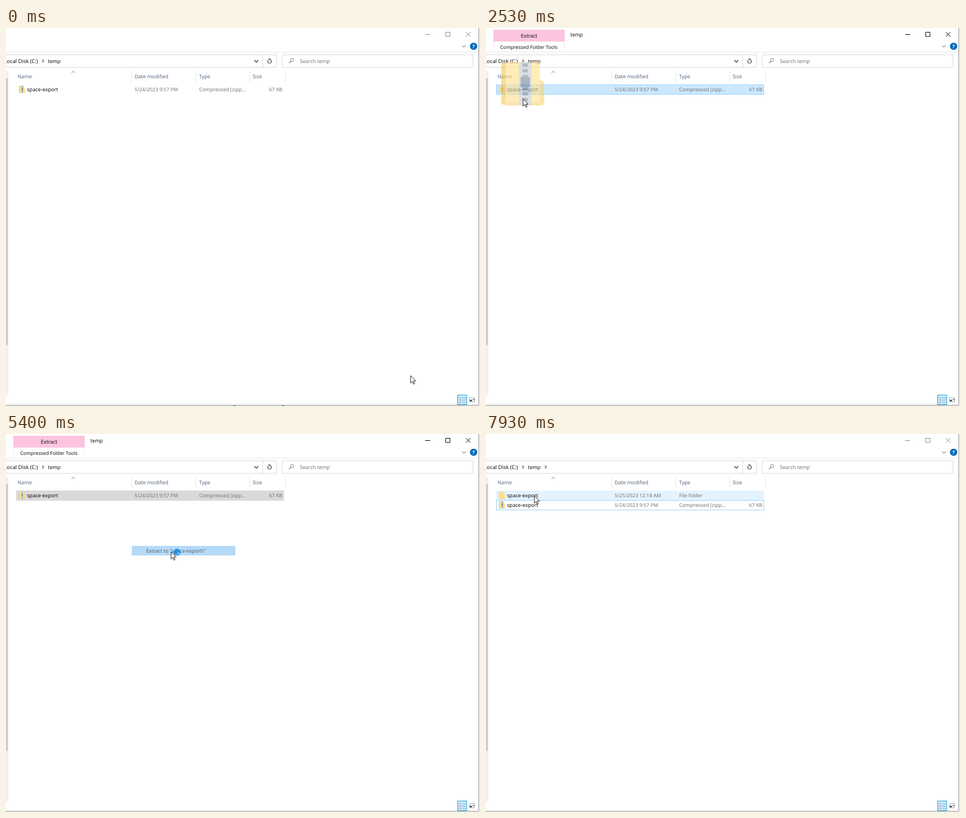
Animation, 837 px wide and 669 px high, one loop 8000 ms. Source, as an HTML page:

```html
<!DOCTYPE html>
<html lang="en">
<head>
<meta charset="utf-8">
<title>Extract an archive</title>
<style>
html, body { margin: 0; width: 100%; height: 100%; overflow: hidden; background: #fff; }
svg { display: block; }
text { font: 9px "Open Sans", "Noto Sans", sans-serif; fill: #000; white-space: pre; text-rendering: geometricPrecision; }
.head { fill: #4c607a; }
.dim { fill: #6d6d6d; }
.name { font-size: 9.1px; }
.path { font-size: 9.3px; }
.date { font-size: 8.8px; }
.menu text { font-size: 8.9px; }
.menu .bold { font-weight: 700; }
.tool { font-size: 8.65px; }
.end { text-anchor: end; }
.mid { text-anchor: middle; }
.line { fill: none; stroke: #d9d9d9; }
.glyph { fill: none; stroke: #444; stroke-width: 1.1; }
#caption { fill: none; }
</style>
</head>
<body>
<svg width="837" height="669" viewBox="0 0 837 669">
  <defs>
    <g id="folderIcon">
      <path d="M0 1.2Q0 .4.8 .4H4.4V12.8H.6Q0 12.8 0 12.2Z" fill="#f2c55c"/>
      <path d="M1 .2H8.6Q9.2 .2 9.2 .8V5.4L10.2 6.2V12.4Q10.2 13 9.6 13H1Z" fill="#ffe08c"/>
      <path d="M9.2 5.4L10.2 6.2V12.4L8.8 13H1.2V12H9.2Z" fill="#f8d374"/>
    </g>
    <g id="zipIcon">
      <use href="#folderIcon"/>
      <path d="M4.2 .2H7.2V13H4.2Z" fill="#c9cdd0"/>
      <path d="M5.7 .6V13" stroke="#7f8f9e" stroke-width="1.3" stroke-dasharray="1 .7"/>
      <path d="M4.6 4.6H6.8V7.6H4.6Z" fill="#6f8397"/>
    </g>
    <path id="right" class="glyph" d="M-1.5 -2.6L1.2 0L-1.5 2.6"/>
  </defs>

  <rect width="837" height="669" fill="#fff"/>
  <path d="M0 42.5H834" stroke="#e8e8e8"/>

  <g id="ribbon">
    <rect x="13" y="3" width="126" height="21" fill="#fcc4df"/>
    <path d="M13.5 24V41M138.5 24V38" stroke="#ececec"/>
    <text class="mid" x="76" y="16.7">Extract</text>
    <text class="mid tool" x="75.7" y="36.5">Compressed Folder Tools</text>
    <text id="title" x="149" y="15">temp</text>
  </g>

  <g id="caption">
    <path d="M740 11.5H749M776.5 7.5H784V15H776.5ZM812.3 7.3L820.3 15.3M820.3 7.3L812.3 15.3"/>
  </g>
  <path d="M805.5 31L808.6 34L811.7 31" class="glyph" style="stroke:#999"/>
  <circle cx="825.7" cy="32.3" r="6.4" fill="#0067b8"/>
  <text class="mid" x="825.7" y="35.7" style="fill:#fff;font-weight:700">?</text>

  <path class="line" d="M-1 47.5H477.5V69.5H-1M453.5 48V69M487.5 47.5H824.5V69.5H487.5Z"/>
  <text class="end path" x="56.3" y="61.7">Local Disk (C:)</text>
  <use href="#right" x="65.5" y="58.5"/>
  <text class="name" x="74" y="61.7">temp</text>
  <use id="crumb" href="#right" x="105.5" y="58.5"/>
  <path class="glyph" d="M438.5 57L442 60.5L445.5 57" style="stroke-width:1.4"/>
  <path class="glyph" d="M463.4 56.3A3.3 3.3 0 1 0 467.6 56.5M463.2 54.6H466.4V57.6" style="stroke-width:1.2"/>
  <path class="glyph" d="M503 58.8L499.6 62.3" style="stroke:#777"/>
  <circle class="glyph" cx="505" cy="56.8" r="2.8" style="stroke:#777;stroke-width:.9"/>
  <text class="dim" x="519" y="61.7">Search temp</text>

  <path d="M0 76H4V650H0Z" fill="#f0f0f0"/>
  <path d="M0 89H3.4V561H0Z" fill="#cbcbcb"/>
  <path d="M221.5 76V96M335.5 76V96M430.5 76V96M493.5 76V96" stroke="#e5e5e5"/>
  <path class="glyph" d="M115.8 79.3L118.8 76.5L121.8 79.3" style="stroke:#777;stroke-width:1"/>
  <text class="head" x="20.5" y="89.3">Name</text>
  <text class="head" x="227" y="89.3">Date modified</text>
  <text class="head" x="341" y="89.3">Type</text>
  <text class="head" x="435.5" y="89.3">Size</text>

  <g id="folder">
    <rect id="folderBack" x="18" y="100" width="473" height="17.3" fill="#e5f3ff"/>
    <use href="#folderIcon" x="23" y="102"/>
    <text class="name" x="37" y="112">space-export</text>
    <text class="dim date" x="227" y="112">5/25/2023 12:18 AM</text>
    <text class="dim" x="341" y="112">File folder</text>
  </g>
  <g id="zip">
    <rect id="zipBack" x="18.5" y="100.5" width="472" height="17"/>
    <use href="#zipIcon" x="23" y="102"/>
    <text class="name" x="37" y="112">space-export</text>
    <text class="dim date" x="227" y="112">5/24/2023 9:57 PM</text>
    <text class="dim" x="341" y="112">Compressed (zipp...</text>
    <text class="dim end date" x="488" y="112">67 KB</text>
  </g>

  <path d="M797.5 649.5H813.5V666.5H797.5Z" fill="#cce8f8" stroke="#26a0da"/>
  <path d="M800 654.5H804M800 658.5H804M800 662.5H804" stroke="#93abc0" stroke-width="1.4"/>
  <path d="M806 654.5H811.5M806 658.5H811.5M806 662.5H811.5" stroke="#7d8c99" stroke-dasharray="2.2 1"/>
  <path d="M818.5 654.5H827.5V661.5H818.5Z" fill="#fff" stroke="#a5a5a5"/>
  <path d="M819 658H823V660.5H819ZM824 657H827V658.3H824Z" fill="#35506b"/>
  <path d="M0 667.5H835" stroke="#a3a3a3"/>
  <path d="M0 668.5H837" stroke="#e2e2e2"/>
  <path d="M834.5 0V668" stroke="#a8a8a8"/>
  <path d="M836 0V669" stroke="#e6e6e6" stroke-width="2"/>
  <path id="specks" d="M401 668.5H406M487 668.5H492" stroke="#2fae8a"/>

  <g id="mainMenu" class="menu"></g>
  <g id="subMenu" class="menu"></g>
  <g id="picked" class="menu"></g>

  <g id="ghost" opacity=".6"><use href="#zipIcon" transform="translate(-38 -66) scale(7.4 6)"/></g>
  <g id="cursor">
    <g id="busy">
      <circle cx="11" cy="1" r="6" fill="#2490e0"/>
      <circle id="spin" cx="11" cy="1" r="3" fill="none" stroke="#b9e2ff" stroke-width="1.3" stroke-dasharray="5 14"/>
    </g>
    <path d="M.5 .3V13.3L3.5 10.5L5.6 15.4L7.5 14.5L5.4 9.8H9.5Z" fill="#fff" stroke="#111" stroke-width=".9"/>
  </g>
</svg>
<script>
const LOOP = 8000, TICK = 200 / 3, PITCH = 17.4;
const $ = id => document.getElementById(id);
const clamp = v => Math.max(0, Math.min(1, v));
const set = (id, attrs) => { for (const k in attrs) $(id).setAttribute(k, attrs[k]); };
const show = (id, on) => { $(id).style.display = on ? '' : 'none'; };

const rowTop = i => 129 + i * PITCH;
const bar = (x, w, top) => `<rect x="${x}" y="${top}" width="${w}" height="17" fill="#91c9f7"/>`;
const label = (x, top, str, cls = '') => `<text x="${x}" y="${top + 11.6}" class="${cls}">${str}</text>`;
const arrow = (x, top) => `<use href="#right" x="${x}" y="${top + 8.3}"/>`;
const panel = (x, w, h) =>
  `<rect x="${x + 4}" y="131" width="${w - 2}" height="${h - 2}" fill="#888" opacity=".55"/>` +
  `<rect x="${x + 3}" y="130" width="${w - 2}" height="${h - 2}" fill="#777" opacity=".7"/>` +
  `<rect x="${x + .5}" y="127.5" width="${w - 1}" height="${h - 1}" fill="#f2f2f2" stroke="#b4b4b4"/>`;

// Main menu entries: label, top edge
const entries = [['7-Zip', 129], ['Extract...', 146.5], ['Copy here', 169.4],
  ['Move here', 186.8, 'bold'], ['Create shortcuts here', 204.2], ['Cancel', 227.2]];
$('mainMenu').innerHTML = panel(65, 159, 119) + bar(67, 155, 129) + arrow(213, 129) +
  '<path d="M91 166.5H222M91 224.5H222" stroke="#d5d5d5"/>' +
  entries.map(([str, top, cls]) => label(92.5, top, str, cls)).join('');

const actions = ['Open archive', 'Open archive', 'Extract files...', 'Extract Here',
  'Extract to "space-export\\"', 'Test archive', 'Add to archive...',
  'Add to "space-export_2.7z"', 'Add to "space-export_2.zip"', 'CRC SHA'];
$('subMenu').innerHTML = panel(220, 187, 177) +
  `<g id="mark">${bar(222, 183, 129)}</g>` +
  actions.map((str, i) => label(247.5, rowTop(i), str)).join('') +
  arrow(395.5, rowTop(1)) + arrow(395.5, rowTop(9));
$('picked').innerHTML = bar(222, 183, Math.floor(rowTop(4))) + label(247.5, rowTop(4), actions[4]);

// Pointer moves: start ms, end ms, end x, end y
const moves = [
  [0, 267, 444, 512], [467, 1333, 75, 159], [1333, 1533, 63, 107],
  [2200, 2533, 65, 125], [2600, 2867, 79, 137], [3133, 3333, 97, 137],
  [3467, 3867, 289, 182], [3867, 4200, 291, 208], [5533, 6200, 189, 213],
  [6667, 7200, 138, 212], [7200, 7533, 90, 137], [7533, 7867, 85, 109]];

function pointer(t) {
  let x = 714, y = 615;
  for (const [from, to, tx, ty] of moves) {
    const u = clamp((t - from) / (to - from));
    const e = .5 * u + .5 * u * u * (3 - 2 * u);
    x += (tx - x) * e;
    y += (ty - y) * e;
  }
  return [Math.round(x), Math.round(y)];
}

function zipStyle(t, y, sorted) {
  if (sorted) return { fill: t > 7500 && y > 117 && y < 134 ? '#e5f3ff' : 'none', stroke: '#99d1ff' };
  if (t > 2630) return { fill: '#d9d9d9', stroke: '#d9d9d9' };
  if (t > 1700) return { fill: '#cce8ff', stroke: '#99d1ff' };
  return { fill: t > 1370 ? '#e5f3ff' : 'none', stroke: 'none' };
}

function draw(now) {
  const t = Math.floor((now % LOOP + 4) / TICK) * TICK;
  const [x, y] = pointer(t);
  const between = (a, b) => t > a && t < b;
  const active = between(1700, 2640) || between(5370, 5640);
  const sorted = t > 6700;

  set('cursor', { transform: `translate(${x} ${y})` });
  set('ghost', { transform: `translate(${x} ${y})` });
  show('ghost', between(2240, 2640));
  show('busy', between(5370, 6170));
  set('spin', { transform: `rotate(${t * .4 % 360} 11 1)` });

  show('ribbon', between(1840, 7440));
  set('title', { style: `fill:${active ? '#000' : '#999'}` });
  set('caption', { stroke: active ? '#000' : '#8c8c8c' });
  show('specks', t < 1370);
  show('crumb', sorted);

  set('zip', { transform: `translate(0 ${sorted ? 17 : 0})` });
  set('zipBack', zipStyle(t, y, sorted));
  show('folder', t > 6440);
  set('folder', { transform: `translate(0 ${sorted ? 0 : 17})` });
  set('folderBack', { opacity: t > 7600 && y < 118 ? 1 : 0 });

  show('mainMenu', between(2640, 5370));
  set('mainMenu', { opacity: clamp((t - 2600) / 267) });
  show('subMenu', between(3240, 5370));
  set('subMenu', { opacity: clamp((t - 3200) / 267) });
  const row = t < 3900 ? 2 : y < 198 ? 3 : 4;
  show('mark', x >= 222);
  set('mark', { transform: `translate(0 ${Math.round(row * PITCH)})` });
  show('picked', between(5370, 5660));
  set('picked', { opacity: clamp(1 - (t - 5267) / 400) });
}

const start = performance.now();
function frame() {
  draw(performance.now() - start);
  requestAnimationFrame(frame);
}
frame();
</script>
</body>
</html>
```
